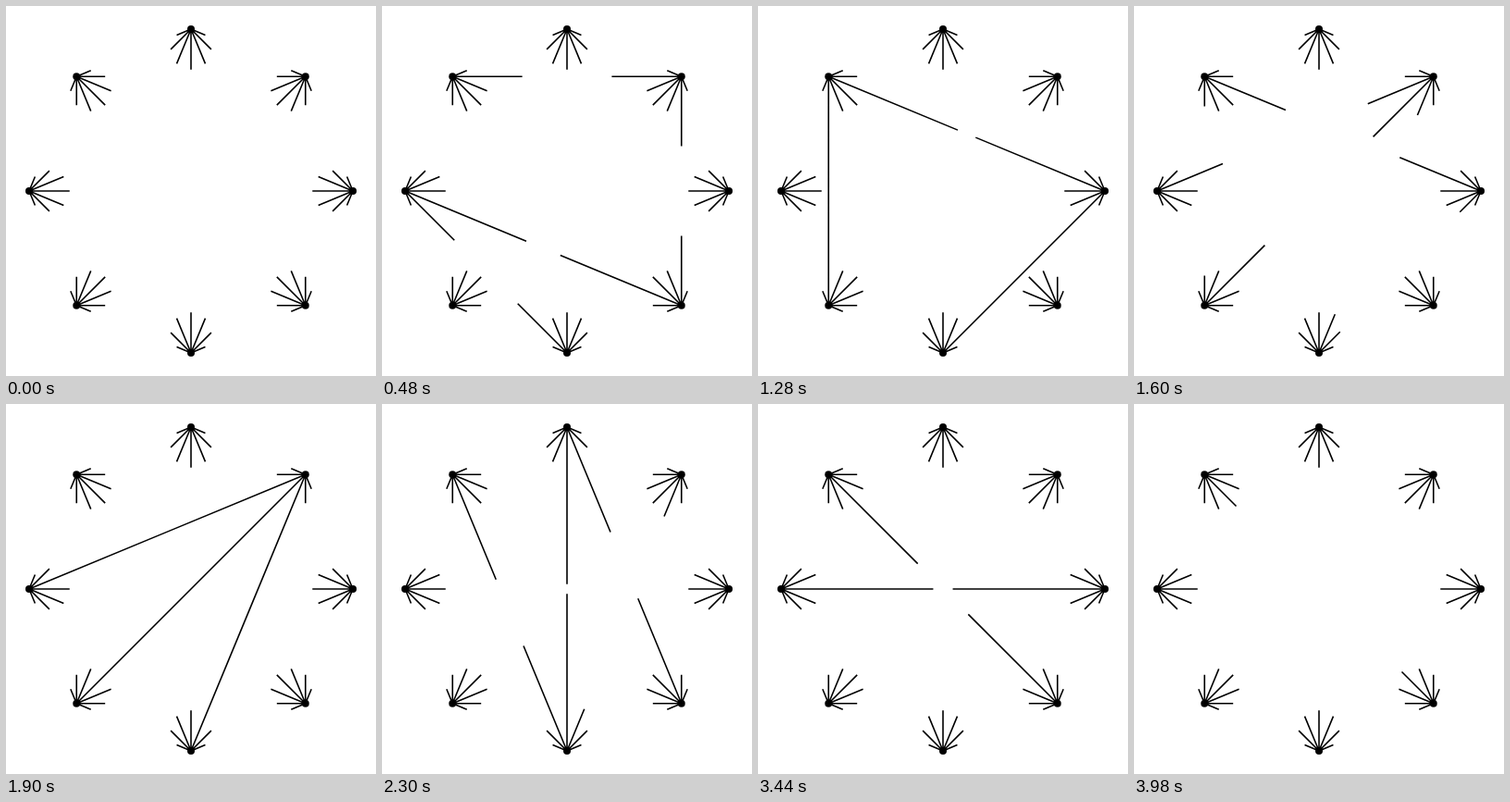
Write an HTML page that moves like this. It is 400x400 px and loops after 4000 ms.

```html
<!DOCTYPE html>
<html lang="en">
<head>
<meta charset="utf-8">
<title>Morphing edges</title>
<style>
  html, body { margin: 0; width: 100%; height: 100%; overflow: hidden; background: #fff; }
  svg { display: block; width: 100%; height: 100%; }
  path { stroke: #000; stroke-width: 1.6; fill: none; }
</style>
</head>
<body>
<svg viewBox="0 0 400 400"><path id="edges"/><g id="nodes"></g></svg>
<script>
const LOOP = 4000, FRAME = 20;
const COUNT = 8, CENTER = 200, RADIUS = 175;
const STUB = 1 / 8;   // resting share of an edge at each end
const SPEED = 0.4;    // px per ms
const HOLD = 127;     // ms an edge stays closed

// Start time of each edge's growth; nodes run clockwise from the right.
const schedule = {
  0: '01 12 23 34 45 56 67 70 57 71 24 14',
  497: '03',
  506: '13 46 60',
  1003: '50',
  1012: '02 35',
  1479: '73',
  1509: '74',
  1588: '72',
  1985: '26',
  2094: '61 25',
  2483: '63',
  2958.5: '04',
  3208.5: '15'
};

const nodes = Array.from({ length: COUNT }, (_, i) => {
  const angle = i * 2 * Math.PI / COUNT;
  return { x: CENTER + RADIUS * Math.cos(angle), y: CENTER + RADIUS * Math.sin(angle) };
});

const edges = Object.entries(schedule).flatMap(([start, pairs]) =>
  pairs.split(' ').map(pair => {
    const [a, b] = [...pair].map(i => nodes[i]);
    return { a, b, start: +start, length: Math.hypot(b.x - a.x, b.y - a.y) };
  }));

function shareAt({ start, length }, time) {
  const travel = (0.5 - STUB) * length;
  const end = start + 2 * travel / SPEED + HOLD;
  const grown = Math.min(time - start, end - time) * SPEED;
  return STUB + Math.max(0, Math.min(travel, grown)) / length;
}

function segment(from, to, share) {
  const x = from.x + (to.x - from.x) * share;
  const y = from.y + (to.y - from.y) * share;
  return `M${from.x.toFixed(2)} ${from.y.toFixed(2)}L${x.toFixed(2)} ${y.toFixed(2)}`;
}

function render(time) {
  document.getElementById('edges').setAttribute('d', edges.map(edge => {
    const share = shareAt(edge, time);
    return segment(edge.a, edge.b, share) + segment(edge.b, edge.a, share);
  }).join(''));
}

document.getElementById('nodes').innerHTML =
  nodes.map(({ x, y }) => `<circle cx="${x}" cy="${y}" r="4"/>`).join('');

const begin = performance.now();
function tick() {
  const time = Math.max(0, performance.now() - begin) % LOOP;
  render(Math.floor(time / FRAME) * FRAME);
  requestAnimationFrame(tick);
}
render(0);
requestAnimationFrame(tick);
</script>
</body>
</html>
```
